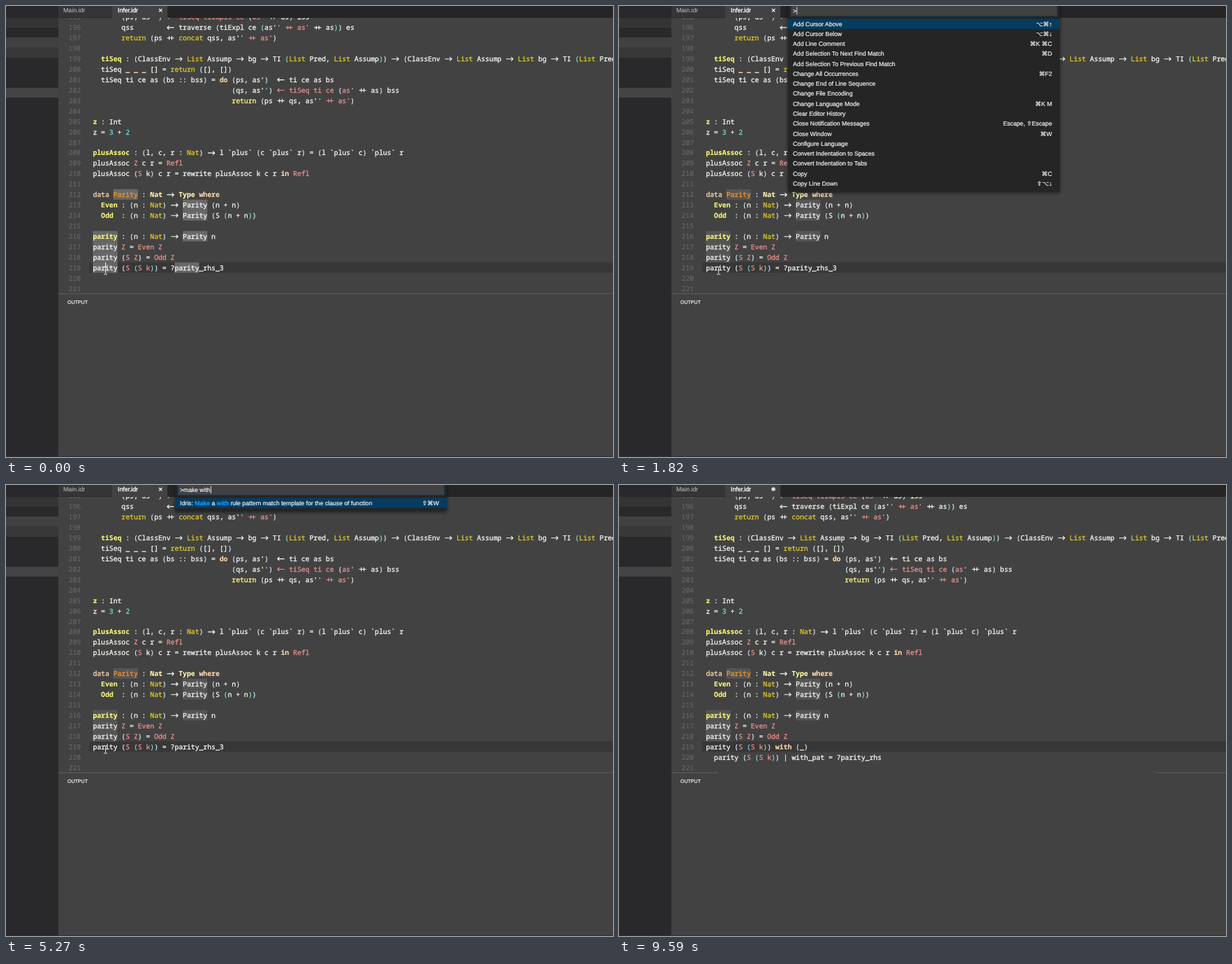
Animation, 869 px wide and 645 px high, one loop 9740 ms. Source, as an HTML page:

```html
<!DOCTYPE html>
<html lang="en">
<head>
<meta charset="utf-8">
<title>Make with rule</title>
<style>
html, body { margin: 0; width: 100%; height: 100%; overflow: hidden; background: #424242; }
svg { display: block; width: 869px; height: 645px; }
text { white-space: pre; text-rendering: geometricPrecision; }
.code { font: 500 9.75px "Noto Sans Mono", "DejaVu Sans Mono", monospace; stroke-width: .3; }
.code .b { font-weight: 700; stroke-width: .1; }
.ui { font: 8.7px "Liberation Sans", "DejaVu Sans", sans-serif; fill: #f4f4f4; stroke: #f4f4f4; stroke-width: .22; }
.ui .hit { fill: #0f9bf5; stroke: #0f9bf5; font-weight: 700; }
#query { font-size: 8.58px; }
.lig { fill: none; stroke-width: 1.1; }
</style>
</head>
<body>
<svg viewBox="0 0 869 645">
  <defs>
    <clipPath id="editor"><rect x="75" y="17" width="794" height="394"/></clipPath>
    <filter id="blur" x="-10%" y="-30%" width="120%" height="180%"><feGaussianBlur stdDeviation="2.5"/></filter>
  </defs>
  <rect width="869" height="645" fill="#424242"/>
  <g id="side"></g>
  <rect x="75" width="794" height="17" fill="#252526"/>
  <rect x="75" width="77" height="16.5" fill="#353536"/>
  <rect x="152" width="79" height="17" fill="#424242"/>
  <text class="ui" x="82" y="9.2" style="font-size:8.8px;fill:#c8c8c8;stroke:none">Main.idr</text>
  <text class="ui" x="160" y="9.2" style="fill:#fff;stroke:#fff;stroke-width:.35">Infer.idr</text>
  <path id="close" d="M219 4l4.4 4.4M223.4 4l-4.4 4.4" stroke="#f0f0f0" stroke-width="1.3"/>
  <circle id="dirty" cx="221" cy="6" r="2.8" fill="#d8d8d8"/>
  <g clip-path="url(#editor)">
    <rect x="119" y="366.5" width="750" height="15" fill="#373737"/>
    <g id="marks"></g>
    <g id="code" class="code"></g>
    <g id="before" class="code"></g>
    <g id="after" class="code"></g>
    <rect id="caret" x="142" y="366.5" width="1" height="15.5" fill="#f4f4f0"/>
  </g>
  <path id="border" stroke="#5c5c5c"/>
  <text class="ui" x="88" y="426.2" style="font-size:7.05px">OUTPUT</text>
  <text id="loading" class="code" x="88.3" y="445.5" fill="#f8f8f4" stroke="#f8f8f4">loading...</text>
  <g id="palette"></g>
  <path id="mouse" d="M-2.5-5.5Q0-5.5 0-4Q0-5.5 2.5-5.5M0-4V4M-2.5 5.5Q0 5.5 0 4Q0 5.5 2.5 5.5" fill="none" stroke="#e8e8e8"/>
  <rect y="644" width="869" height="1" fill="#303030"/>
</svg>
<script>
const LOOP = 9740, COL = 5.85, ROW = 14.94, LEFT = 124.4;
const $ = id => document.getElementById(id);
const colX = col => LEFT + col * COL;
const baseY = line => 377.8 - (219 - line) * ROW;
const esc = s => s.replace(/&/g, '&amp;').replace(/</g, '&lt;').replace(/>/g, '&gt;');
const rect = (x, y, w, h, fill) => `<rect x="${x}" y="${y}" width="${w}" height="${h}" fill="${fill}"/>`;

const INK = {
  w: '#f8f8f4', y: '#fdfb78', g: '#dfca24', r: '#e8908f', o: '#f5952c',
  p: '#ffd9b0', t: '#fffcb4', n: '#6fdcd8', q: '#9fc4d8'
};
const PAREN = ['#d4e4f4', '#7fd8d0'];

// {k text} colours a run; capital keys are bold
const lines = [
  "       (ps, as'') {r <- tiSeq tiImpls ce (as}{q '} ++ as) iss",
  "       qss        <- traverse (tiExpl ce (as'{q '} {r ++ as'} ++ as)) es",
  "       {g return} (ps ++ {g concat} qss, as'{q '} {r ++ as'})",
  "",
  "  {Y tiSeq} : (ClassEnv -> {g List} Assump -> bg -> TI ({g List} Pred, {g List} Assump)) -> (ClassEnv -> {g List} Assump -> {g List} bg -> TI ({g List} Pred, {g List} Assump))",
  "  tiSeq {P _ _ _} [] = {g return} ([], [])",
  "  tiSeq ti ce as (bs :: bss) = {P do} (ps, as')  <- ti ce as bs",
  "                                  (qs, as'{q '}) {r <- tiSeq ti ce (as}{q '} ++ as) bss",
  "                                  {y return} (ps ++ qs, as'{q '} {r ++ as'})",
  "",
  "{Y z} : Int",
  "z = {n 3} + {n 2}",
  "",
  "{Y plusAssoc} : (l, c, r : {g Nat}) -> l `plus` (c `plus` r) = (l `plus` c) `plus` r",
  "plusAssoc {r Z} c r = {r Refl}",
  "plusAssoc ({r S} k) c r = rewrite plusAssoc k c r {P in} {r Refl}",
  "",
  "{p data} {o Parity} : {T Nat} -> {T Type} {P where}",
  "  {Y Even} : (n : {g Nat}) -> Parity (n + n)",
  "  {Y Odd}  : (n : {g Nat}) -> Parity (S (n + n))",
  "",
  "{Y parity} : (n : {g Nat}) -> Parity n",
  "parity {r Z} = {r Even Z}",
  "parity ({r S Z}) = {r Odd Z}"
];
const oldClause = ["parity ({r S} ({r S} {r k})) = ?parity_rhs_3"];
const newClause = ["parity ({r S} ({r S} {r k})) {P with} ({P _})",
                   "  parity ({r S} ({r S} {r k})) | with_pat = ?parity_rhs"];

function ligature(tok, x, y, color) {
  const m = y - 3.3;
  const d = tok === '++'
    ? `M${x + .8} ${m}h10.2M${x + 4} ${m - 2.7}v5.4M${x + 7.8} ${m - 2.7}v5.4`
    : tok === '->'
      ? `M${x + .8} ${m}h9.8M${x + 7.9} ${m - 2.6}l2.7 2.6l-2.7 2.6`
      : `M${x + 1.1} ${m}h9.8M${x + 3.8} ${m - 2.6}l-2.7 2.6l2.7 2.6`;
  return `<path class="lig" d="${d}" stroke="${color}"/>`;
}

function codeLine(src, line) {
  const y = baseY(line);
  let col = 0, depth = 0, out = '';
  for (const [, key = 'w', inner, plain] of src.matchAll(/\{(\w) ([^}]*)\}|([^{]+)/g)) {
    const bold = key < 'a' ? ' class="b"' : '';
    for (const [tok] of (inner ?? plain).matchAll(/->|<-|\+\+|[()]| +|(?:(?!->|<-|\+\+)[^() ])+/g)) {
      let color = INK[key.toLowerCase()];
      if (tok === '(') color = PAREN[depth++ % 2];
      if (tok === ')') color = PAREN[Math.max(--depth, 0) % 2];
      const x = colX(col);
      if (/^(->|<-|\+\+)$/.test(tok)) out += ligature(tok, x, y, color);
      else if (tok.trim()) out += `<text${bold} x="${x}" y="${y}" fill="${color}" stroke="${color}">${esc(tok)}</text>`;
      col += tok.length;
    }
  }
  return out;
}
const block = (src, first) => src.map((s, i) => codeLine(s, first + i)).join('');

let numbers = '';
for (let n = 195; n <= 221; n++) numbers += `<text x="89.6" y="${baseY(n)}" fill="#6c6c6c">${n}</text>`;
$('code').innerHTML = numbers + block(lines, 195);
$('before').innerHTML = block(oldClause, 219);
$('after').innerHTML = block(newClause, 219);

$('side').innerHTML = rect(0, 0, 75, 645, '#29292b') + rect(0, 17, 75, 14, '#343435') +
  rect(0, 45, 75, 14, '#414142') + rect(0, 59, 75, 15, '#383839') + rect(0, 117, 75, 14, '#444445');

const commands = [
  ['Add Cursor Above', '⌥⌘↑'], ['Add Cursor Below', '⌥⌘↓'], ['Add Line Comment', '⌘K ⌘C'],
  ['Add Selection To Next Find Match', '⌘D'], ['Add Selection To Previous Find Match', ''],
  ['Change All Occurrences', '⌘F2'], ['Change End of Line Sequence', ''], ['Change File Encoding', ''],
  ['Change Language Mode', '⌘K M'], ['Clear Editor History', ''],
  ['Close Notification Messages', 'Escape, ⇧Escape'], ['Close Window', '⌘W'], ['Configure Language', ''],
  ['Convert Indentation to Spaces', ''], ['Convert Indentation to Tabs', ''], ['Copy', '⌘C'],
  ['Copy Line Down', '⇧⌥↓']
];
const makeWith = 'Idris: Make a with rule pattern match template for the clause of function';

// Marks each query word where it next occurs in the label
function highlight(label, query) {
  let out = '', rest = label;
  for (const word of query.split(' ').filter(Boolean)) {
    const i = rest.search(new RegExp('\\b' + word, 'i'));
    if (i < 0) continue;
    out += rest.slice(0, i) + `<tspan class="hit">${rest.slice(i, i + word.length)}</tspan>`;
    rest = rest.slice(i + word.length);
  }
  return out + rest;
}

let shown;
function drawPalette(query, caretOn) {
  const key = query + '|' + caretOn;
  if (key === shown) return;
  shown = key;
  if (query === null) { $('palette').innerHTML = ''; return; }
  const full = query.length < 2;
  const rows = full ? commands : [[highlight(makeWith, query), '⇧⌘W']];
  const h = full ? 265 : 36.5;
  $('palette').innerHTML =
    `<rect x="242" y="-4" width="389" height="${h + 6}" fill="#000" opacity=".6" filter="url(#blur)"/>` +
    rect(242, 0, 389, h, '#252526') + rect(246, 0, 381.5, 14.6, '#0d4568') + rect(246.8, 0, 380, 13.8, '#414141') +
    rect(242, 18.5, 389, 14.3, '#073c5f') +
    `<text id="query" class="ui" x="249" y="9.6">&gt;${query}</text>` +
    rows.map(([label, keys], i) => {
      const y = 28.5 + i * 14.28;
      return `<text class="ui" x="249" y="${y}">${label}</text>` +
        `<text class="ui" x="620" y="${y}" text-anchor="end">${keys}</text>`;
    }).join('');
  if (caretOn) {
    const x = 249 + $('query').getComputedTextLength() + .3;
    $('palette').insertAdjacentHTML('beforeend', rect(x, 1.5, .9, 10.5, '#f4f4f4'));
  }
}

const at = (track, t) => track.findLast(([time]) => time <= t)[1];
const query = [[0, null], [770, ''], [1970, 'm'], [2120, 'mak'], [2270, 'make'], [2420, 'make '],
  [2570, 'make a'], [3620, 'make a '], [3770, 'make a w'], [4070, 'make a '], [4520, 'make a'],
  [4670, 'make '], [4820, 'make w'], [4970, 'make wi'], [5120, 'make wit'], [5270, 'make with'], [5720, null]];
const queryCaret = [[0, true], [1370, false], [1820, true], [3170, false], [3620, true]];
const caret = [[0, true], [300, false], [5720, true], [6170, false], [6770, true], [7220, false],
  [7670, true], [8270, false], [8720, true], [9320, false]];
const mouse = [[0, [142.5, 378.5]], [8120, [640, 520]], [8270, [764, 590]], [8420, [820, 602]], [9020, null]];

const EDIT = 7670;
const words = [[212, 5], [213, 22], [214, 22], [216, 0], [216, 22], [217, 0], [218, 0]];

function drawMarks(focused, edited) {
  const list = focused ? [...words, [219, 0], ...(edited ? [] : [[219, 20]])] : words;
  const fill = focused ? '#686868' : '#555555';
  $('marks').innerHTML = list.map(([line, col]) =>
    rect(colX(col), baseY(line) - 11.2, 6 * COL, ROW, fill)).join('');
}

const show = (id, on) => $(id).setAttribute('visibility', on ? 'visible' : 'hidden');

function render(t) {
  const typed = at(query, t), edited = t >= EDIT, pos = at(mouse, t);
  drawMarks(typed === null && t < 9590, edited);
  drawPalette(typed, at(queryCaret, t));
  show('before', !edited);
  show('after', edited);
  show('close', !edited);
  show('dirty', edited);
  show('caret', at(caret, t));
  show('loading', t >= 6320 && !edited);
  show('mouse', pos);
  if (pos) $('mouse').setAttribute('transform', `translate(${pos})`);
  $('border').setAttribute('d', t < 8270 ? 'M75 411.5H869' : 'M75 411.5H142M768 411.5H869');
}

const start = performance.now();
function frame() {
  render((performance.now() - start) % LOOP);
  requestAnimationFrame(frame);
}
frame();
</script>
</body>
</html>
```
